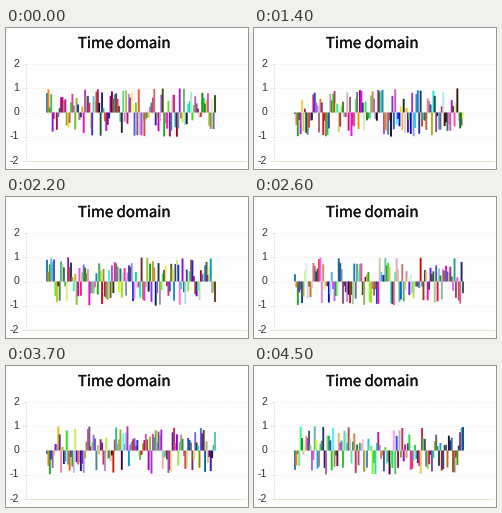
Write a matplotlib script that moves like this. It is 242x141 px and loops after 4700 ms.

```python
import numpy as np
import matplotlib.pyplot as plt
from matplotlib import patheffects
from matplotlib.animation import FuncAnimation
from matplotlib.collections import LineCollection

W, H, DPI = 242, 141, 64
PX = 72 / DPI                      # one pixel in points
STEP = 100                         # ms per frame
CUTS = [200, 600, 1000, 1400, 1800, 2200, 2600, 3000, 3300, 3700, 4200, 4500]
LOOP = 4700
FIRST = [0.8, 0.4, -0.95, 0.6, -0.06, -0.5, 0.9, 0.3, -0.7, 0.5, -0.15, 0.7, -0.8]
ZERO, UNIT = 84.5, 24.2
N = 120
TITLE_FONT, TICK_FONT = "Noto Sans CJK JP", "Liberation Sans"
LEAD = np.array([[31, 119, 180], [255, 127, 14], [44, 160, 44]]) / 255


def level(v):
    return ZERO - UNIT * v


def signal(k):
    """Random heights in short runs of one sign, with a few strays."""
    rng = np.random.default_rng(40 + k)
    sign = np.sign(FIRST[k])
    vals = []
    while len(vals) < N:
        n = rng.integers(1, 8)
        size = rng.uniform(0.1, 1, n) ** 0.85
        stray = np.where(rng.random(n) < 0.15, -1, 1)
        vals.extend(sign * stray * size)
        sign = -sign
    vals[0] = FIRST[k]
    colors = rng.uniform(0, 1, (N, 3))
    colors[:len(LEAD)] = LEAD
    return np.array(vals[:N]), colors


signals = [signal(k) for k in range(len(FIRST))]
xs = np.linspace(41, 209, N)

fig = plt.figure(figsize=(W / DPI, H / DPI), dpi=DPI, facecolor="#fdfdfd")
ax = fig.add_axes([0, 0, 1, 1])
ax.set_xlim(0, W)
ax.set_ylim(H, 0)
ax.axis("off")

title = ax.text(118, 20, "Time domain", family=TITLE_FONT, size=15 * PX,
                color="#111111", ha="center", va="baseline")
title.set_path_effects([patheffects.withStroke(linewidth=0.35 * PX,
                                               foreground="#111111")])
for v in range(-2, 3):
    y = level(v)
    ax.text(13, y + 2.6, str(v), family=TICK_FONT, size=10.5 * PX,
            color="#333333", ha="right", va="baseline")
    ax.plot([17, 20], [y, y], color="#e6e6d8", lw=PX)
    if v > -2:
        ax.plot([20, 240], [y, y], color="#ececdf", lw=PX, ls=(0, (1, 2)))
ax.plot([20, 240], [level(-2)] * 2, color="#e4e4d0", lw=PX)
ax.plot([19.5, 19.5], [level(2), level(-2)], color="#e4e4d6", lw=PX, ls=(0, (2, 1)))

bars = LineCollection([], linewidths=1.9 * PX, capstyle="butt", zorder=3)
bars.set_snap(False)
ax.add_collection(bars, autolim=False)


def draw(i):
    vals, colors = signals[np.searchsorted(CUTS, i * STEP, side="right")]
    bars.set_segments([[(x, ZERO), (x, level(v))] for x, v in zip(xs, vals)])
    bars.set_color(colors)
    return [bars]


anim = FuncAnimation(fig, draw, frames=LOOP // STEP, init_func=lambda: draw(0),
                     interval=STEP, repeat=True, repeat_delay=0)
plt.show()
```
